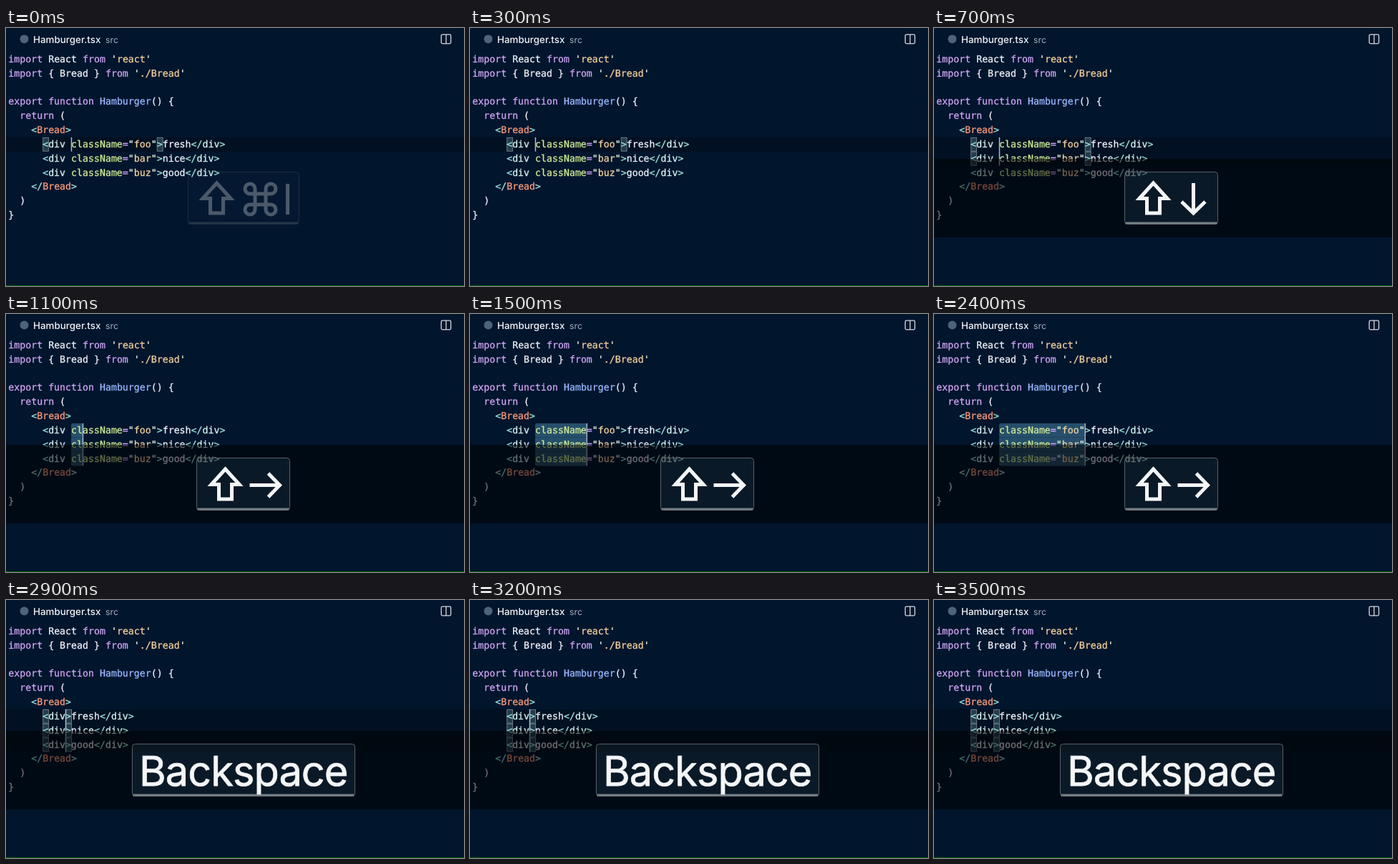
An HTML page for the animation above (3600 ms loop, 640x361 px).

```html
<!DOCTYPE html>
<html lang="en">
<head>
<meta charset="utf-8">
<title>Multi-cursor editing</title>
<style>
  html, body { margin: 0; width: 100%; height: 100%; overflow: hidden; background: #01152d; }
  svg { display: block; width: 640px; height: 361px; }
  text { white-space: pre; text-rendering: geometricPrecision; }
  .ui { font-family: Inter, "Open Sans", sans-serif; }
  #code text { font: 13.25px "DejaVu Sans Mono", "Noto Sans Mono", monospace; }
  #code tspan { stroke: currentColor; stroke-width: .3; fill: currentColor; }
  .plain { color: #ecf1f8; }
  .key { color: #cfa4f3; }
  .str { color: #f2d09b; }
  .quote { color: #e6f9e8; }
  .fn { color: #98b8ff; }
  .punct { color: #9be3db; }
  .comp { color: #fb9c7a; }
  .tag { color: #d4f4f0; }
  .attr { color: #cfeb92; }
  .line { fill: #000; opacity: .25; }
  .sel { fill: #264f6c; }
  .match { fill: #7fb0bf; fill-opacity: .28; stroke: #8aa2a6; stroke-opacity: .7; }
  .caret { fill: #a3bfd3; }
  .cap { fill: #5f93b3; fill-opacity: .11; stroke: #56626a; }
  .foot { fill: none; stroke: #737e84; stroke-width: 3; }
  .glyph { fill: none; stroke: #f4f6f7; stroke-width: 5; }
  .word { font-size: 57.6px; letter-spacing: -.9px; text-anchor: middle; fill: #f4f6f7; stroke: #f4f6f7; stroke-width: .8; }
</style>
</head>
<body>
<svg viewBox="0 0 640 361">
  <defs>
    <path id="shift" class="glyph" d="M0 -22 L-19.5 -.5 h10.5 v20.5 h18 v-20.5 h10.5 z"/>
    <path id="arrow" class="glyph" d="M-22 0 H19 M4 -16.5 L20 0 L4 16.5"/>
    <path id="loop" d="M-7.5 -7.5 h-7 a7 7 0 1 1 7 -7 z"/>
    <g id="cmd" class="glyph">
      <rect x="-7.5" y="-7.5" width="15" height="15"/>
      <use href="#loop"/>
      <use href="#loop" transform="rotate(90)"/>
      <use href="#loop" transform="rotate(180)"/>
      <use href="#loop" transform="rotate(270)"/>
    </g>
  </defs>
  <rect width="640" height="361" fill="#01152d"/>

  <circle cx="25.5" cy="15.5" r="6" fill="#4b6479"/>
  <text class="ui" x="38" y="20.5" font-size="13.4" font-weight="500" fill="#f2f5f8">Hamburger.tsx</text>
  <text class="ui" x="139" y="20.5" font-size="12.3" fill="#a3aebb">src</text>
  <g fill="none" stroke="#d5dade" stroke-width="1.3">
    <rect x="608.2" y="9.2" width="13.4" height="12.6" rx="1.5"/>
    <path d="M615 9 V22"/>
  </g>

  <g id="marks"></g>
  <g id="code"></g>
  <g id="carets"></g>

  <rect id="band" y="183" width="640" height="110" fill="#000" opacity=".53"/>
  <g id="toggle"><use href="#shift" x="294.5" y="239"/><use href="#cmd" x="355.5" y="239.5"/><path class="glyph" d="M393.5 218 V261"/></g>
  <g id="down"><use href="#shift" x="306.5" y="239"/><use href="#arrow" transform="translate(362.5 239) rotate(90)"/></g>
  <g id="right"><use href="#shift" x="306.5" y="239"/><use href="#arrow" x="362.5" y="239.5"/></g>
  <g id="erase"><text class="ui word" x="331.8" y="260">Backspace</text></g>

  <rect y="360" width="640" height="1" fill="#006400"/>
</svg>
<script>
const LOOP = 3600, LEFT = 3.3, ADVANCE = 7.977, PITCH = 19.84;
const FIRST = 6, TAG = 6;
const $ = id => document.getElementById(id);
const colX = col => LEFT + col * ADVANCE;
const rowTop = row => 33.9 + row * PITCH;

function add(parent, name, attrs) {
  const el = document.createElementNS('http://www.w3.org/2000/svg', name);
  for (const k in attrs) el.setAttribute(k, attrs[k]);
  return parent.appendChild(el);
}

// Tokens are written as "class:text", parted by "|".
function write(row, col, tokens) {
  const text = add($('code'), 'text', { x: colX(col), y: 47.8 + row * PITCH });
  for (const token of tokens.split('|')) {
    const cut = token.indexOf(':');
    add(text, 'tspan', { class: token.slice(0, cut) }).textContent = token.slice(cut + 1);
  }
  return text;
}

write(0, 0, "key:import|plain: React |key:from|quote: '|str:react|quote:'");
write(1, 0, "key:import|plain: { Bread } |key:from|quote: '|str:./Bread|quote:'");
write(3, 0, 'key:export function|fn: Hamburger|plain:() {');
write(4, 2, 'key:return|plain: (');
write(5, 4, 'punct:<|comp:Bread|punct:>');
write(9, 4, 'punct:</|comp:Bread|punct:>');
write(10, 2, 'plain:)');
write(11, 0, 'plain:}');

const box = (cls, row, col, parent = $('marks')) => add(parent, 'rect', {
  class: cls, x: colX(col) + .5, y: rowTop(row) + .5, width: ADVANCE, height: PITCH - 1
});

const rows = [['foo', 'fresh'], ['bar', 'nice'], ['buz', 'good']].map(([name, body], i) => {
  const row = FIRST + i;
  const line = add($('marks'), 'rect', { class: 'line', y: rowTop(row), width: 640, height: PITCH });
  const sel = add($('marks'), 'rect', {
    class: 'sel', x: colX(11), y: rowTop(row), height: PITCH, rx: i === 1 ? 0 : 2
  });
  const open = box('match', row, TAG), close = box('match', row, 0);
  write(row, TAG, 'punct:<|tag:div');
  const attr = write(row, 11, `attr:className|key:=|quote:"|str:${name}|quote:"`);
  const tail = write(row, 26, `punct:>|plain:${body}|punct:</|tag:div|punct:>`);
  const caret = add($('carets'), 'rect', {
    class: 'caret', y: rowTop(row), width: 1.5, height: PITCH
  });
  return { line, sel, open, close, attr, tail, caret };
});

function keycap(id, x, width) {
  const g = $(id);
  const foot = add(g, 'path', { class: 'foot', d: `M${x + 1.5} 273 H${x + width - 1.5}` });
  const cap = add(g, 'rect', { class: 'cap', x: x + .5, y: 201.5, width: width - 1, height: 73, rx: 4 });
  g.prepend(cap, foot);
}
keycap('toggle', 254, 156);
keycap('down', 266, 131);
keycap('right', 266, 131);
keycap('erase', 176, 312);

const show = (el, on) => { el.style.display = on ? '' : 'none'; };

function caretCol(t) {
  if (t >= 2800) return 10;
  if (t >= 2600 || t < 1000) return 11;
  if (t < 1500) return Math.min(20, 12 + Math.floor((t - 1000) / 55));
  return Math.min(26, 20 + Math.floor((t - 1500) / 125));
}

function draw(t) {
  const col = caretCol(t);
  const count = t < 600 ? 1 : t < 900 ? 2 : 3;
  const selecting = t >= 1000 && t < 2600;
  const erased = t >= 2600;
  const blinkedOff = t >= 3300;
  const end = erased ? col : 26;

  rows.forEach((r, i) => {
    const active = i < count, idle = active && !selecting;
    show(r.line, idle);
    show(r.open, idle);
    show(r.close, idle);
    show(r.sel, selecting);
    show(r.caret, active && !blinkedOff);
    show(r.attr, !erased);
    r.close.setAttribute('x', colX(end) + .5);
    r.tail.setAttribute('x', colX(end));
    r.caret.setAttribute('x', colX(col) - .3);
    r.sel.setAttribute('width', Math.max(0, (col - 11) * ADVANCE));
  });

  show($('band'), t >= 600);
  $('toggle').style.opacity = Math.max(0, .3 * (1 - t / 300));
  show($('down'), t >= 600 && t < 1000);
  show($('right'), selecting);
  show($('erase'), erased);
}

const start = performance.now();
function tick() {
  const t = (performance.now() - start) % LOOP;
  draw(Math.floor(t / 100) * 100);
  requestAnimationFrame(tick);
}
tick();
</script>
</body>
</html>
```
